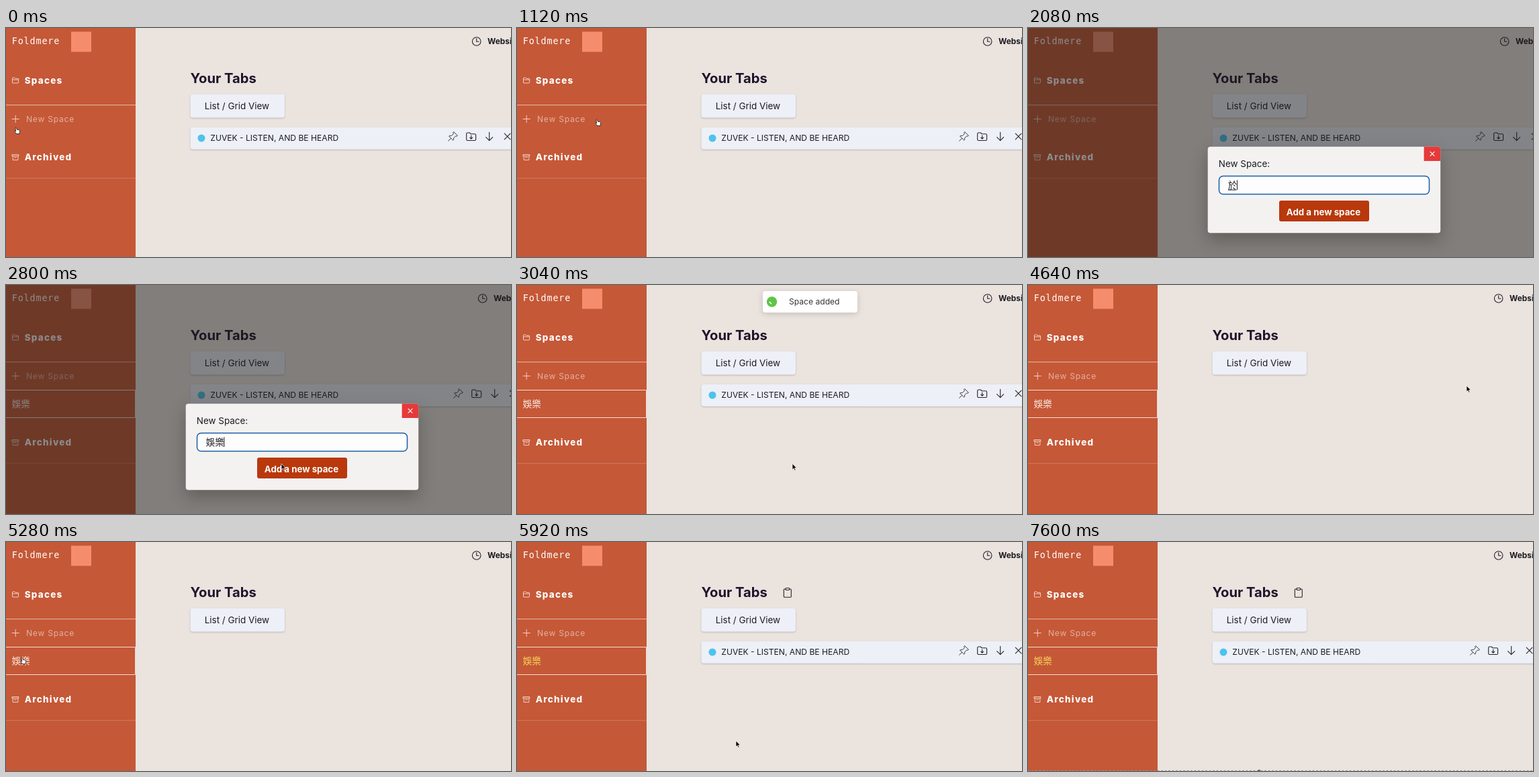
Write an HTML page that moves like this. It is 752 by 341 pixels and loops after 7680 ms.

```html
<!DOCTYPE html>
<html lang="zh-Hant">
<head>
<meta charset="utf-8">
<title>Tab manager</title>
<style>
html, body { margin: 0; width: 100%; height: 100%; overflow: hidden; background: #eae3de; }
svg { display: block; font: 13.44px Inter, "Noto Sans CJK TC", sans-serif; fill: #1c1c22; }
.line { fill: none; stroke: #25232b; stroke-width: 1.1; stroke-linecap: round; stroke-linejoin: round; }
.side { stroke: #f6dcd2; stroke-width: .9; }
.bold { font-weight: 700; }
.menu { font-weight: 800; letter-spacing: 1.25px; fill: #fff; }
.small { font-size: 12.1px; }
.card { fill: #edf0f7; filter: drop-shadow(0 1px 1.2px rgba(60, 50, 50, .26)); }
#modalBox { filter: drop-shadow(0 10px 12px rgba(0, 0, 0, .25)); }
#toast > rect { filter: drop-shadow(0 2px 4px rgba(0, 0, 0, .16)); }
</style>
</head>
<body>
<svg width="752" height="341" viewBox="0 0 752 341">
  <rect width="752" height="341" fill="#eae3de"/>

  <g id="header">
    <g class="line"><circle cx="700.7" cy="20" r="6.3"/><path d="M700.7 15.8V20.2H704"/></g>
    <text class="bold" x="717" y="24" style="font-size:11.9px">Website</text>
  </g>

  <text class="bold" x="274.5" y="82" fill="#20132b" style="font-size:20.2px">Your Tabs</text>
  <g id="clipboard" class="line">
    <path d="M400 70H398.6Q397.3 70 397.3 71.3V81Q397.3 82.3 398.6 82.3H407Q408.3 82.3 408.3 81V71.3Q408.3 70 407 70H405.6"/>
    <rect x="400" y="68.5" width="5.6" height="3" rx="1"/>
  </g>
  <rect class="card" x="274.5" y="98.5" width="140.5" height="35" rx="4"/>
  <text x="295.7" y="120.7">List / Grid View</text>

  <g id="row">
    <rect class="card" x="274.5" y="148" width="490" height="32.7" rx="4"/>
    <circle cx="291" cy="164" r="5.5" fill="#4cc3ec"/>
    <text class="small" x="304.3" y="168">ZUVEK - LISTEN, AND BE HEARD</text>
    <g id="actions" class="line">
      <path d="M666.8 154.8L672.4 160.2L670.8 161.4L669.6 161L666.6 163.8Q667 166 665.8 167.2L659.6 161.2Q661 160 663.4 160.4L666.4 157.6L665.8 156ZM662.6 164.3L658.6 168.2" stroke-width=".9"/>
      <path d="M685.7 166V157.7Q685.7 156 687.2 156H690.4L692.2 157.8H698Q699.6 157.8 699.6 159.3V166Q699.6 167.5 698 167.5H687.2Q685.7 167.5 685.7 166ZM692.7 160V165M690.7 163.2L692.7 165.2L694.7 163.2"/>
      <path d="M719.7 155.3V167.5M714.7 162.7L719.7 167.6L724.7 162.7"/>
      <path d="M742.3 157.2L751 165.9M751 157.2L742.3 165.9"/>
    </g>
  </g>

  <rect width="193" height="341" fill="#c55837"/>
  <text x="8.7" y="24" fill="#fff" style="font:13.44px 'DejaVu Sans Mono',monospace;letter-spacing:.85px">Foldmere</text>
  <rect x="97" y="5.5" width="30" height="30" fill="#f58d6c"/>
  <path class="line side" d="M9.5 81V75Q9.5 74 10.5 74H12.8L14 75.3H17.6Q18.6 75.3 18.6 76.3V81Q18.6 82 17.6 82H10.5Q9.5 82 9.5 81ZM9.5 77H18.6"/>
  <text class="menu" x="27.7" y="83">Spaces</text>
  <path d="M0 114.7H193" stroke="#dfa792" stroke-width="1.3"/>
  <path class="line side" d="M9 135.5H19.4M14.2 130.3V140.7"/>
  <text class="small" x="30" y="140" fill="#e3b09e" letter-spacing=".75">New Space</text>
  <g id="space">
    <path d="M0 156.5H192.5V197.5H0" fill="none" stroke="#f4dcd2"/>
    <text id="spaceName" x="8.8" y="182">娛樂</text>
  </g>
  <g id="archive">
    <path class="line side" d="M9.3 188.5H18.8V190.7H9.3ZM10.2 190.7V196.6H17.9V190.7M12.6 192.8H15.5"/>
    <text class="menu" x="27.7" y="197">Archived</text>
    <path d="M0 223.7H193" stroke="#cf7b60"/>
  </g>

  <g id="modal">
    <rect width="752" height="341" fill="rgba(27,27,27,.5)"/>
    <rect id="modalBox" x="267.7" y="176.7" width="346.5" height="128.5" rx="4" fill="#f3f2f1"/>
    <path d="M589.6 176.7H610Q614.2 176.7 614.2 181V198H589.6Z" fill="#e53a3a"/>
    <path class="line" d="M599 184.4L605 190.4M605 184.4L599 190.4" style="stroke:#fff"/>
    <text x="283.8" y="207">New Space:</text>
    <rect x="284.5" y="220.5" width="313" height="27" rx="6" fill="#fdfdfd" stroke="#1d5ca8" stroke-width="1.5"/>
    <text id="typed" x="297.8" y="239"></text>
    <rect id="underline" x="298" y="240.6" height="1"/>
    <rect id="caret" y="226.5" width="1" height="14.5"/>
    <rect x="374" y="257" width="134" height="31" rx="3" fill="#b9380c"/>
    <text class="bold" x="384.8" y="278.7" fill="#fff" style="font-size:13.3px">Add a new space</text>
  </g>

  <g id="toast">
    <rect x="366" y="9" width="141" height="32" rx="4" fill="#fff"/>
    <circle cx="379.5" cy="25" r="7.7" fill="#5fc545"/>
    <path id="check" class="line" d="M376.2 25.4L378.7 27.8L382.7 22.6" pathLength="1" style="stroke:#fff;stroke-width:1.5;stroke-dasharray:1 2"/>
    <text class="small" x="405" y="29" fill="#363636">Space added</text>
  </g>

  <g id="frameEdge">
    <path d="M0 340.5H752" stroke="#96918d" stroke-dasharray="3 2.5"/>
    <circle cx="344" cy="341.5" r="2.5" fill="#5b5d68"/>
  </g>

  <g id="cursor">
    <path id="arrow" d="M0 0V9L2.1 7.1L3.5 10.3L5 9.6L3.6 6.6H6.4Z" fill="#000" stroke="#fff" stroke-width=".7"/>
    <path id="hand" d="M-1.2 .6Q-.4-.2 .4 .8L1.6 3.4L4.6 3.8Q5.8 4.2 5.6 5.8L5 9.6H1L-2.2 6.6Q-2.4 5.3-1 5.6L-.2 6Z" fill="#fff" stroke="#111" stroke-width=".8"/>
  </g>
</svg>
<script>
const LOOP = 7680, STEP = 80;
const $ = id => document.getElementById(id);
const show = (id, on) => { $(id).style.display = on ? '' : 'none'; };
const shift = (id, x, y) => $(id).setAttribute('transform', `translate(${x} ${y})`);
const within = (t, from, to) => t >= from && t < to;
const ramp = (t, from, to) => Math.min(1, Math.max(0, (t - from) / (to - from)));
const smooth = p => p * p * (3 - 2 * p);

// time, x, y of the pointer tip
const pointer = [
  [80, 15, 148], [800, 119, 136], [2400, 119, 136], [2720, 410, 266],
  [3280, 410, 266], [4000, 692, 160], [4480, 692, 160], [4640, 653, 150],
  [5200, 24, 172], [5520, 24, 172], [5840, 326, 296], [6640, 326, 296], [6800, 326, 350]
];
// time, text, still being composed
const typing = [
  [0, '', false], [1920, 'ㄩ', true], [2000, '於', true], [2160, '於ㄌ', true],
  [2240, '於ㄌㄜ', true], [2400, '娛樂', true], [2480, '娛樂', false]
];

function pointerAt(t) {
  const i = pointer.findIndex(k => k[0] > t);
  if (i === 0) return pointer[0].slice(1);
  if (i < 0) return pointer.at(-1).slice(1);
  const [t0, x0, y0] = pointer[i - 1], [t1, x1, y1] = pointer[i];
  const p = smooth(ramp(t, t0, t1));
  return [x0 + (x1 - x0) * p, y0 + (y1 - y0) * p];
}

function render(t) {
  const modal = ramp(t, 1200, 1440) * (1 - ramp(t, 2800, 2960));
  const added = t >= 2800, opened = t >= 5360;

  show('modal', modal > 0);
  $('modal').style.opacity = modal;
  shift('header', modal > 0 ? 9 : 0, 0);
  shift('actions', modal > 0 ? 8 : 0, 0);

  const [, text, composing] = typing.findLast(k => k[0] <= t);
  const width = text.length * 13.44;
  $('typed').textContent = text;
  $('underline').setAttribute('width', composing ? width - 1 : 0);
  $('caret').setAttribute('x', 297.5 + width);
  show('caret', !within(t, 1440, 1680));

  show('space', added);
  $('spaceName').setAttribute('fill', opened ? '#f6d55c' : '#fbeee8');
  shift('archive', 0, added ? 42 : 0);
  show('row', !within(t, 4400, 5360));
  show('clipboard', opened);

  const toast = smooth(ramp(t, 2800, 3000)) * (1 - smooth(ramp(t, 4160, 4480)));
  $('toast').style.opacity = toast;
  shift('toast', 0, -45 * (1 - toast));
  $('check').style.strokeDashoffset = 1 - ramp(t, 2960, 3200);

  const [x, y] = pointerAt(t);
  const hand = x < 193 && !within(t, 1200, 2800);
  shift('cursor', x, y);
  show('cursor', !within(t, 1680, 2400));
  show('hand', hand);
  show('arrow', !hand);
  show('frameEdge', t >= 6800);
}

const start = performance.now();
function tick() {
  const t = (performance.now() - start) % LOOP;
  render(Math.max(0, Math.floor(t / STEP) * STEP));
  requestAnimationFrame(tick);
}
tick();
</script>
</body>
</html>
```
